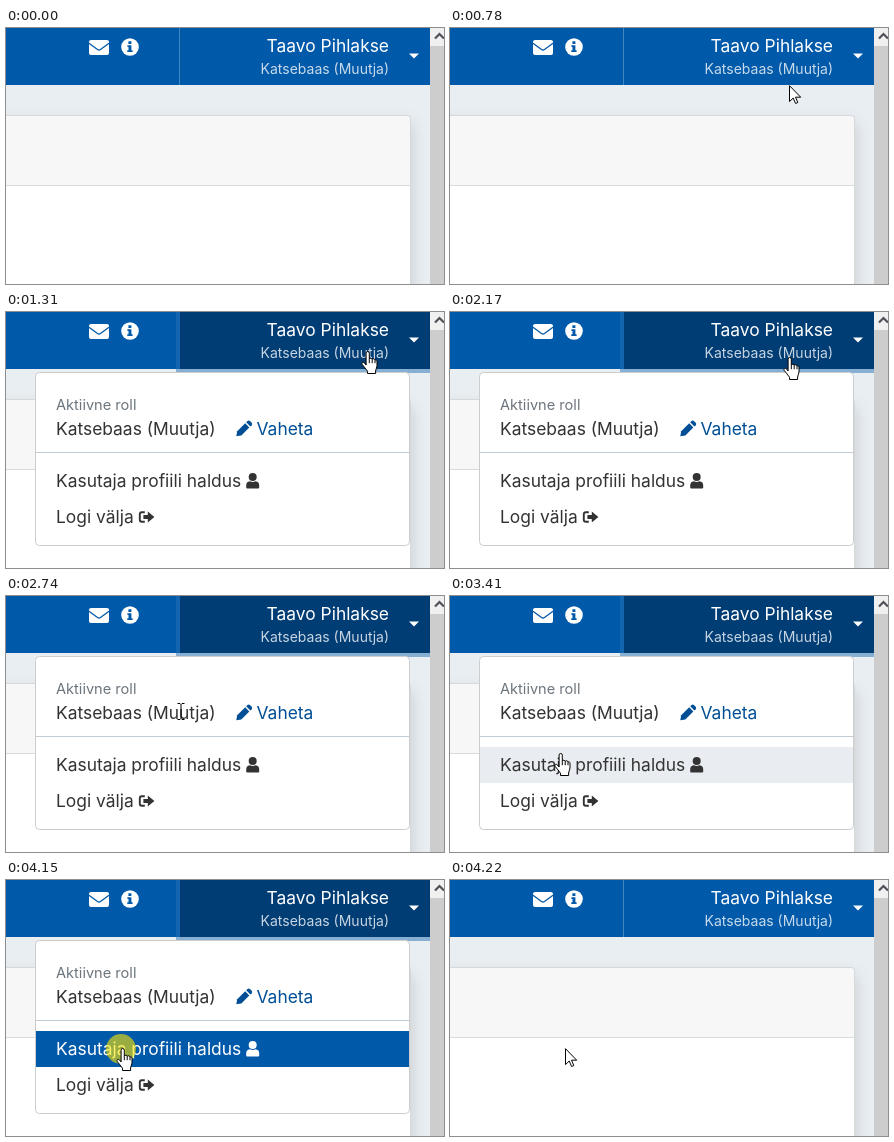
Animation of 438 by 256 pixels, one loop 4880 ms. Source, as an HTML page:

```html
<!DOCTYPE html>
<html lang="et">
<head>
<meta charset="utf-8">
<title>Kasutaja menüü</title>
<style>
html, body { margin: 0; width: 100%; height: 100%; overflow: hidden; background: #e9eef2; }
svg { display: block; width: 438px; height: 256px; }
text { font-family: Inter, "Noto Sans", sans-serif; font-size: 17.4px; fill: #333; }
.small { font-size: 14px; }
.end { text-anchor: end; }
.white { fill: #fff; }
.link { fill: #004f96; }
.pointer { fill: #fff; stroke: #000; stroke-linejoin: round; }
#card { filter: drop-shadow(0 8px 8px rgba(0, 0, 0, .15)); }
</style>
</head>
<body>
<svg viewBox="0 0 438 256">
  <rect width="438" height="256" fill="#e9eef2"/>
  <g id="card"><rect x="-20" y="87" width="425" height="220" rx="4" fill="#d6d8da"/></g>
  <rect x="-20" y="88" width="424" height="218" rx="3.5" fill="#fff"/>
  <path d="M0 88H400.5a3.5 3.5 0 0 1 3.5 3.5V157H0z" fill="#f7f7f7"/>
  <path d="M0 157.5H404" stroke="#d9dadb"/>

  <rect width="424" height="57" fill="#0059a9"/>
  <rect id="ring" x="170" y="0" width="254" height="61" fill="#2672b6" fill-opacity=".5"/>
  <rect id="button" x="174" width="250" height="57"/>
  <path id="divider" d="M173.5 0V57" stroke="#4087c2"/>
  <rect x="83" y="12" width="20" height="15" rx="2" class="white"/>
  <path d="M83 15.2l8.5 6.3q1.5 1 3 0l8.5-6.3" fill="none" stroke="#0059a9" stroke-width="1.3"/>
  <circle cx="124" cy="19" r="8.8" class="white"/>
  <path d="M122.4 13.2h3v2.8h-3zM121.4 17.3h4v5h1.2v1.8h-5.3v-1.8h1.2v-3.2h-1.1z" fill="#0059a9"/>
  <text x="383" y="24" class="end white">Taavo Pihlakse</text>
  <text x="383" y="46" class="small end white" fill-opacity=".78">Katsebaas (Muutja)</text>
  <path d="M403 25.5h10l-5 5z" class="white"/>

  <rect x="424" width="14" height="256" fill="#f0f0f0"/>
  <rect x="424" y="18" width="14" height="238" fill="#cdcdcd"/>
  <path d="M429 10.5l4.5-4.5 4.5 4.5" fill="none" stroke="#505058" stroke-width="2.2"/>

  <g id="menu">
    <rect x="29.5" y="60.5" width="374" height="173" rx="4" fill="#fff" stroke="#cbcdcf"/>
    <text x="50" y="98" style="font-size:14.6px;fill:#6c757d">Aktiivne roll</text>
    <text x="50" y="123">Katsebaas (Muutja)</text>
    <text x="250.5" y="123" class="link">Vaheta</text>
    <g class="link">
      <path d="M230.3 124.3l.9-5 8-8 4.1 4.1-8 8z"/>
      <path d="M240.2 110.3l1.3-1.3q1.2-1 2.4 0l1.8 1.8q1 1.2 0 2.4l-1.3 1.3z"/>
    </g>
    <path d="M30 140.5H403" stroke="#c4ccd3"/>
    <rect id="row" x="30" y="151" width="373" height="36"/>
    <g id="item">
      <text x="50" y="175" style="fill:inherit">Kasutaja profiili haldus</text>
      <circle cx="246.7" cy="165" r="4"/>
      <path d="M240.2 175.5v-2q0-3.8 3.6-4.2q2.9 1.5 5.8 0q3.6.4 3.6 4.2v2q0 .9-1 .9h-11q-1 0-1-.9z"/>
    </g>
    <text x="50" y="211">Logi välja</text>
    <path d="M138.8 200.2h-3q-2 0-2 2v5.6q0 2 2 2h3" fill="none" stroke="#333" stroke-width="1.9"/>
    <path d="M137.4 203h4.4v-3.4l6.6 5.4-6.6 5.4V207h-4.4z" fill="#333"/>
  </g>

  <circle id="press" cx="115" cy="169" r="15" fill="#ffe600" fill-opacity=".6"/>
  <g id="arrow" class="pointer"><path d="M.5.7V16.6L4.2 13l2.4 5.5 2.2-1L6.5 12.2h5.2z"/></g>
  <g id="hand" class="pointer">
    <path d="M-.9 14V2.1a1.6 1.6 0 0 1 3.2 0V8.2a1.5 1.5 0 0 1 2.9.3a1.5 1.5 0 0 1 2.8.7a1.2 1.2 0 0 1 2 .9V15c0 2-1.4 3-1.4 5v2.5H.5V20.2C-1 18-3 15.8-4.8 13.4c-1-1.6 1-2.8 2.2-1.5z"/>
    <path d="M2.3 8.2v4M5.2 8.5v3.7M8 9.2v3" fill="none"/>
  </g>
  <path id="beam" d="M-3.5-7.5h2.5l1 1 1-1h2.5M0-6.5v14M-3.5 8.5H-1l1-1 1 1h2.5" fill="none" stroke="#000"/>
</svg>
<script>
const LOOP = 4880, OPEN = 1310, PRESS = 4150, CLOSE = 4220;
const $ = id => document.getElementById(id);
const show = (id, on) => $(id).setAttribute("visibility", on ? "visible" : "hidden");

// start, end, steps, then evenly spaced waypoints
const moves = [
  [200, 690, 7, [224, 243], [323, 72]],
  [780, 1240, 6, [339, 57], [354, 45], [361, 39]],
  [2170, 2670, 7, [339, 45], [188, 101]],
  [2740, 2740, 1, [175, 115]],
  [3200, 3820, 9, [158, 126], [110, 157], [104, 168], [116, 168]],
  [CLOSE, CLOSE, 1, [115, 168]]
];

function position(t) {
  const move = moves.filter(m => m[0] <= t).pop();
  if (!move) return null;
  const [from, to, steps, ...pts] = move;
  const done = to > from ? Math.min(1, (t - from) / (to - from)) : 1;
  const u = Math.floor(done * steps + 1e-6) / steps * (pts.length - 1);
  const i = Math.min(Math.floor(u), Math.max(0, pts.length - 2));
  const a = pts[i], b = pts[i + 1] || a;
  return a.map((v, k) => Math.round(v + (b[k] - v) * (u - i)));
}

function draw(t) {
  const p = position(t);
  const [x, y] = p || [0, 256];
  const open = t >= OPEN && t < CLOSE;
  const pressed = t >= PRESS && t < CLOSE;
  const active = t >= 1240 && t < CLOSE;
  const overButton = x > 173 && y < 57;
  const overRow = open && y >= 151 && y < 187;
  const overText = open && x > 50 && x < 210 && y > 104 && y < 130;
  const kind = overButton || overRow ? "hand" : overText ? "beam" : "arrow";

  show("ring", active);
  show("divider", !active);
  $("button").setAttribute("fill", active ? "#003d75" : overButton ? "#004483" : "#0059a9");
  show("menu", open);
  $("row").setAttribute("fill", pressed ? "#0059a9" : overRow ? "#e9edf1" : "#fff");
  $("item").setAttribute("fill", pressed ? "#fff" : "#333");
  show("press", pressed);
  for (const id of ["arrow", "hand", "beam"]) {
    show(id, p && id === kind);
    $(id).setAttribute("transform", `translate(${x} ${y})`);
  }
}

const start = performance.now();
function tick() {
  draw((performance.now() - start) % LOOP);
  requestAnimationFrame(tick);
}
tick();
</script>
</body>
</html>
```
